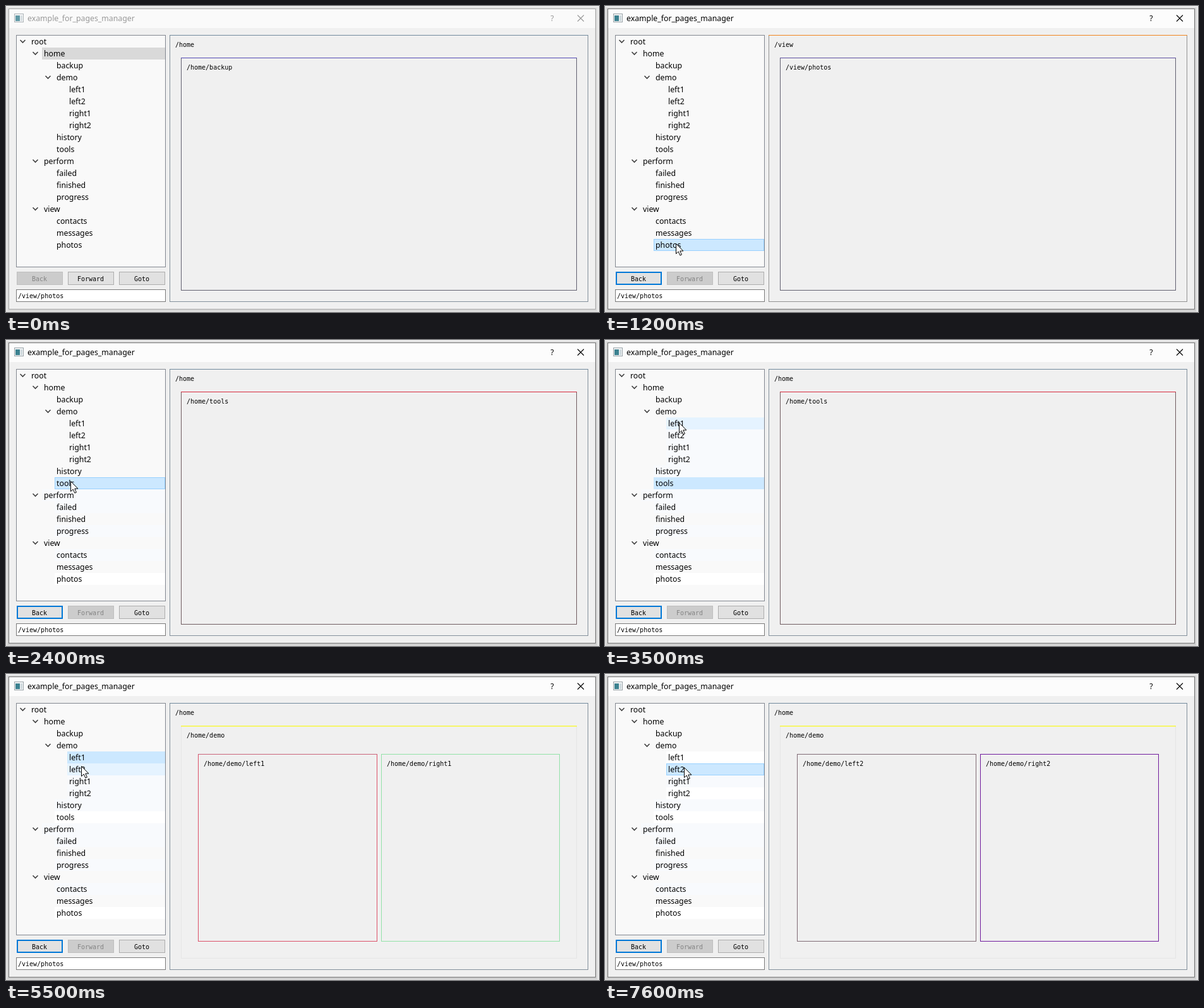
An HTML page that plays this animation: 939x486 px, repeating every 8000 ms.

```html
<!DOCTYPE html>
<html lang="en">
<head>
<meta charset="utf-8">
<title>Pages manager</title>
<style>
  html, body { margin: 0; width: 100%; height: 100%; overflow: hidden; background: #f3f3f3; }
  svg { display: block; width: 939px; height: 486px; }
  text { white-space: pre; }
  .ui { font: 12.3px "Noto Sans", "Open Sans", sans-serif; }
  .mono { font: 10px "DejaVu Sans Mono", "Liberation Mono", monospace; }
</style>
</head>
<body>
<svg id="stage" viewBox="0 0 939 486" xmlns="http://www.w3.org/2000/svg"></svg>
<script>
const LOOP = 8000, TICK = 100, ROW_TOP = 47, ROW_H = 19;

const tree = `root
 home
  backup
  demo
   left1
   left2
   right1
   right2
  history
  tools
 perform
  failed
  finished
  progress
 view
  contacts
  messages
  photos`.split('\n').map(line => {
  const name = line.trim();
  return { name, x: 37 + 20 * (line.length - name.length) };
});
tree.forEach((row, i) => { row.open = i + 1 < tree.length && tree[i + 1].x > row.x; });

// Cursor moves: first step, last step, end point, ease-out power
const START = { x: 560, y: 445 };
const moves = [
  { from: 300, to: 900, x: 112, y: 378, power: 2 },
  { from: 1500, to: 1900, x: 102, y: 225, power: 1.4 },
  { from: 2900, to: 3500, x: 117, y: 132, power: 1.4 },
  { from: 5500, to: 5800, x: 124, y: 181, power: 1.3 },
  { from: 6700, to: 7200, x: 125, y: 149, power: 2 }
];
const presses = [
  { at: 0, name: 'home' }, { at: 1000, name: 'photos' }, { at: 2200, name: 'tools' },
  { at: 4300, name: 'left1' }, { at: 6200, name: 'right2' }, { at: 7400, name: 'left2' }
];
const pages = [
  { at: 0, path: '/home/backup' }, { at: 1200, path: '/view/photos' },
  { at: 2400, path: '/home/tools' },
  { at: 4500, path: '/home/demo', split: ['left1', 'right1'] },
  { at: 6400, path: '/home/demo', split: ['left1', 'right2'] },
  { at: 7600, path: '/home/demo', split: ['left2', 'right2'] }
];
// Frame colours: top edge, other edges
const colors = {
  '/home': ['#71899c', '#83909b'], '/view': ['#f0851f', '#929292'],
  '/home/backup': ['#5148b4', '#626070'], '/view/photos': ['#5d4fa0', '#626070'],
  '/home/tools': ['#d6283c', '#705c60'], '/home/demo': ['#f8f83c', '#e5e5e5'],
  left1: ['#c9647a', '#dc5068'], left2: ['#806a74', '#806a74'],
  right1: ['#92e2a8', '#92e2a8'], right2: ['#6f1b9c', '#6f1b9c']
};

const latest = (list, t) => list.filter(item => item.at <= t).pop();

function cursorAt(t) {
  if (t < moves[0].from) return null;
  let pos = START;
  for (const m of moves) {
    if (t < m.from) break;
    const f = Math.min(1, (t - m.from + TICK) / (m.to - m.from + TICK));
    const e = 1 - (1 - f) ** m.power;
    pos = { x: pos.x + (m.x - pos.x) * e, y: pos.y + (m.y - pos.y) * e };
  }
  return { x: Math.round(pos.x), y: Math.round(pos.y) };
}

function hoveredName(c) {
  if (!c || c.x < 17 || c.x > 252) return null;
  const row = tree[Math.floor((c.y - ROW_TOP) / ROW_H)];
  return row ? row.name : null;
}

// Rows that were highlighted before keep a faint tint
function tintsAt(t) {
  const tints = {};
  for (let s = 1200; s < t; s += TICK) {
    const hover = hoveredName(cursorAt(s));
    if (hover && !tints[hover]) tints[hover] = '#f8fafd';
    tints[latest(presses, s).name] = '#fff';
  }
  return tints;
}

const rect = (x, y, w, h, fill, extra = '') =>
  `<rect x="${x}" y="${y}" width="${w}" height="${h}" fill="${fill}" ${extra}/>`;
const box = (x, y, w, h, fill, stroke, width = 1) =>
  rect(x + width / 2, y + width / 2, w - width, h - width, fill, `stroke="${stroke}" stroke-width="${width}"`);
const text = (x, y, s, cls, fill = '#000', anchor = 'start') =>
  `<text x="${x}" y="${y}" class="${cls}" fill="${fill}" text-anchor="${anchor}">${s}</text>`;
const line = (d, stroke, width) =>
  `<path d="${d}" fill="none" stroke="${stroke}" stroke-width="${width}"/>`;

function frame(x, y, w, h, key, label, topWidth = 1) {
  const [top, side] = colors[key];
  return box(x, y, w, h, 'none', side) + rect(x, y, w, topWidth, top) + text(x + 9, y + 19, label, 'mono');
}

function button(x, label, enabled, isDefault) {
  const shape = !enabled ? box(x, 422, 73, 21, '#ccc', '#bfbfbf')
    : isDefault ? box(x, 422, 73, 21, '#e1e1e1', '#0078d7', 2)
    : box(x, 422, 73, 21, '#e1e1e1', '#adadad');
  return shape + text(x + 36, 437, label, 'mono', enabled ? '#000' : '#838383', 'middle');
}

function windowChrome(active) {
  const ink = active ? '#000' : '#999';
  let out = rect(0, 0, 939, 486, '#f3f3f3');
  for (let i = 4; i > 0; i--) {
    out += rect(4 - i, 5 - i, 930 + 2 * i, 478 + 2 * i, '#000', `opacity="${active ? 0.045 : 0.03}"`);
  }
  return out + box(4, 4, 930, 478, '#f0f0f0', active ? '#777' : '#aaa') +
    rect(5, 5, 928, 30, active ? '#fcfcfc' : '#fafafa') +
    `<g opacity="${active ? 1 : 0.8}">` + box(13, 12, 15, 14, '#f4f6f7', '#9aa3a8') +
    rect(15, 15, 7, 9, '#3c8290') + rect(23, 15, 3, 9, '#cfd9dd') + '</g>' +
    text(34, 24, 'example_for_pages_manager', 'ui', ink) +
    text(865, 24, '?', 'ui', ink, 'middle') +
    line('M905 14.5l10 10m0-10l-10 10', ink, 1.1);
}

function treeView(t, active, cursor) {
  const selected = latest(presses, t).name, hover = hoveredName(cursor), tints = tintsAt(t);
  return box(16, 46, 237, 369, '#f9f9f9', '#828790') + tree.map(({ name, x, open }, i) => {
    const y = ROW_TOP + i * ROW_H, w = 252 - x;
    let out = '';
    if (name === selected) {
      out = !active ? rect(x, y, w, ROW_H, '#d9d9d9')
        : name === hover ? box(x, y, w, ROW_H, '#cce8ff', '#99d1ff')
        : rect(x, y, w, ROW_H, '#cce8ff');
    } else if (name === hover) {
      out = rect(x, y, w, ROW_H, '#e5f3ff');
    } else if (tints[name]) {
      out = rect(x, y, w, ROW_H, tints[name]);
    }
    if (open) out += line(`M${x - 14.5} ${y + 7}l4 4 4-4`, '#404040', 1.6);
    return out + text(x + 3, y + 14, name, 'ui');
  }).join('');
}

function pageView({ path, split }) {
  const parent = path.slice(0, 5);
  let out = frame(259, 46, 663, 424, parent, parent) +
    frame(277, 82, 627, 370, path, path, split ? 1.5 : 1);
  if (split) {
    out += frame(304, 127, 284, 298, split[0], `${path}/${split[0]}`) +
      frame(594, 127, 283, 298, split[1], `${path}/${split[1]}`);
  }
  return out;
}

const arrow = ({ x, y }) =>
  `<path transform="translate(${x + 0.5} ${y - 0.5})" d="M0 0V16L3.7 12.6 6.4 18.6 8.9 17.5 6.3 11.6H11.4Z" fill="#fff" stroke="#000"/>`;

function render(t) {
  const active = t >= 1000, cursor = cursorAt(t), page = latest(pages, t), moved = t >= 1200;
  return windowChrome(active) + treeView(t, active, cursor) +
    button(17, 'Back', moved, true) + button(98, 'Forward', !moved) + button(179, 'Goto', true) +
    box(16, 450, 237, 20, '#fff', '#7a7a7a') + text(19, 464, '/view/photos', 'mono') +
    pageView(page) + (cursor ? arrow(cursor) : '');
}

const stage = document.getElementById('stage');
const start = performance.now();
let shown = -1;
function update() {
  const elapsed = Math.max(0, performance.now() - start) % LOOP;
  const t = Math.floor(elapsed / TICK) * TICK;
  if (t !== shown) stage.innerHTML = render(shown = t);
  requestAnimationFrame(update);
}
update();
</script>
</body>
</html>
```
